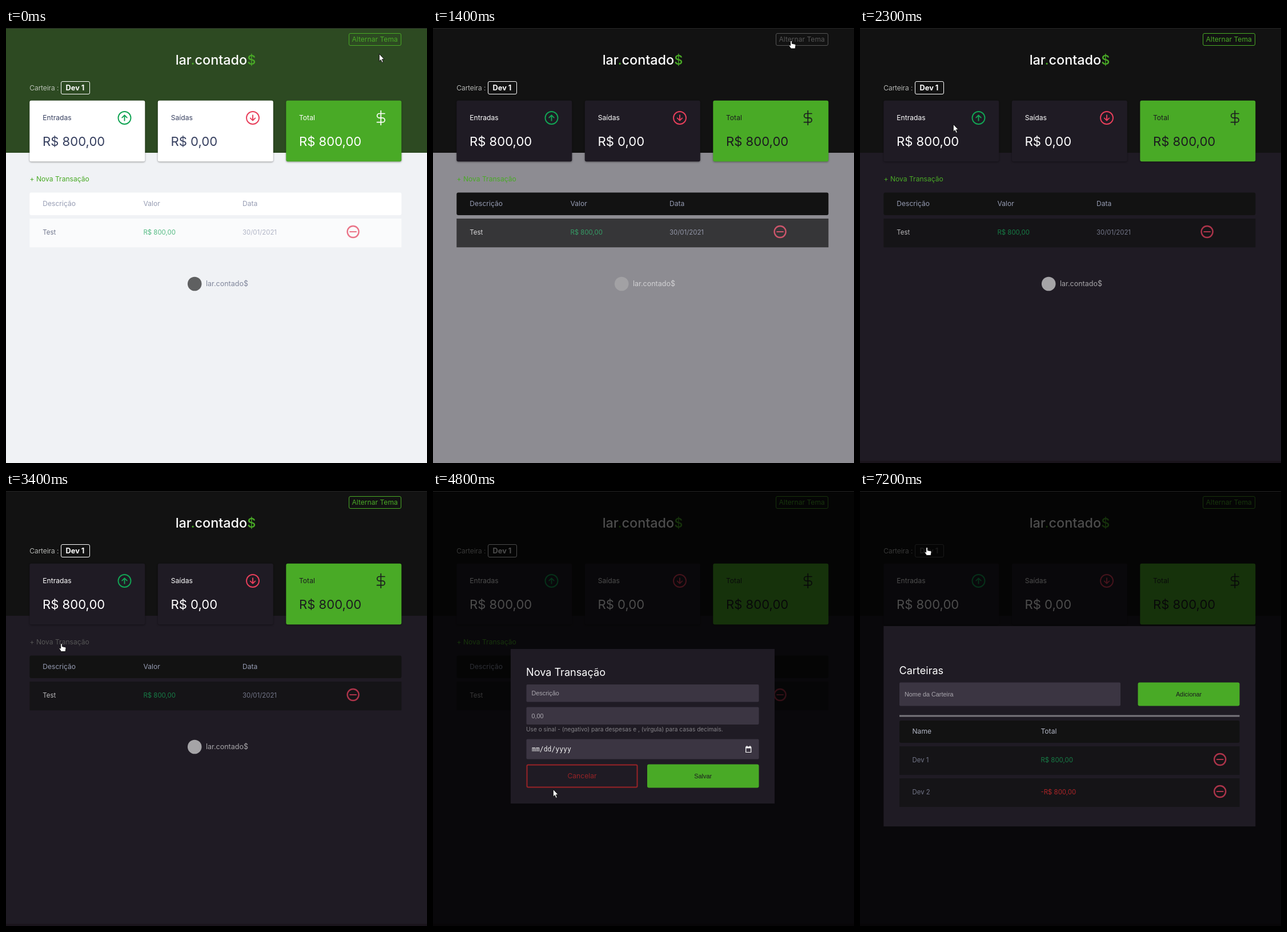
An HTML page for the animation above (8000 ms loop, 737x760 px).

```html
<!DOCTYPE html>
<html lang="pt-BR">
<head>
<meta charset="utf-8">
<title>Carteira</title>
<style>
  html, body { margin: 0; width: 100%; height: 100%; overflow: hidden; }
  svg { display: block; width: 737px; height: 760px; }
  #stage {
    --head: #2d4a22; --card: #fff; --ink: #363f5f; --table: #fff;
    --on-total: #fff; --hover: #3dd705; --green: #49aa26;
    background: var(--page);
    font: 12.1px Inter, "Open Sans", sans-serif;
  }
  #stage.dark {
    --head: #121212; --card: #1f1b24; --ink: #fff; --table: #121212;
    --on-total: #1b1b1f; --hover: #555;
  }
  .head { fill: var(--head); }
  .card { fill: var(--card); filter: drop-shadow(0 1.5px 1.5px rgba(0, 0, 0, .4)); }
  .card.total { fill: var(--green); }
  .ink { fill: var(--ink); }
  .on-total { fill: var(--on-total); }
  .big { font-size: 22.1px; }
  .brand { font-size: 23.4px; font-weight: 500; fill: #fff; }
  .accent { fill: var(--green); }
  .light { font-weight: 300; }
  .table { fill: var(--table); }
  .muted { fill: #969cb3; }
  .row { opacity: .7; font-size: 11.4px; }
  .row.hover { opacity: 1; }
  .plus { fill: #12a454; }
  .minus { fill: #e92929; }
  .line { fill: none; stroke-width: 1.9; stroke-linecap: round; stroke-linejoin: round; }
  .up { stroke: #12a454; }
  .down { stroke: #e83f5b; }
  .dollar { stroke: var(--on-total); stroke-width: 1.7; }
  .link { fill: var(--green); }
  .frame { fill: none; stroke: var(--green); }
  .wallet { fill: #fff; font-size: 12.8px; font-weight: 700; }
  .wallet-frame { fill: none; stroke: #fff; }
  .hover > .link, .hover > .wallet { fill: var(--hover); }
  .hover > .frame, .hover > .wallet-frame { stroke: var(--hover); }
  .footer { opacity: .6; font-size: 12.5px; }
  .edge { fill: #1a141c; visibility: hidden; }
  .settled .edge { visibility: visible; }
  .modal { visibility: hidden; }
  .modal.open { visibility: visible; }
  .shade { fill: #000; fill-opacity: .7; }
  .panel { fill: #1f1b24; }
  .title { font-size: 18.1px; fill: #fff; }
  .field { fill: #3b3542; }
  .ui { font: 10.85px "Liberation Sans", Arial, sans-serif; fill: #aaa7ae; }
  .ui.label { fill: #1b1b1f; text-anchor: middle; }
  .date { font: 11.45px "DejaVu Sans Mono", monospace; fill: #f2f2f2; }
  .help { font-size: 10.15px; fill: #858388; }
  .cancel { opacity: .6; }
  .cancel.hover { opacity: 1; }
  .cancel rect { fill: none; stroke: #e92929; stroke-width: 2; }
  .cancel text { fill: #e92929; text-anchor: middle; }
  .pointer { fill: #fff; stroke: #111; stroke-linejoin: round; }
</style>
</head>
<body>
<svg id="stage" viewBox="0 0 737 760">
  <defs>
    <g id="remove" class="line down">
      <circle r="10" stroke-width="2.4"/>
      <path d="M-5.5 0H5.5"/>
    </g>
    <g id="arrow" class="line">
      <circle r="11"/>
      <path d="M0 4.8V-4.5M-4.3 -.4L0 -4.7L4.3 -.4"/>
    </g>
    <rect id="card" width="202" height="106.5" rx="3"/>
  </defs>

  <rect class="head" width="737" height="218"/>
  <rect width="737" height="1" fill="#242424"/>
  <rect class="edge" y="756" width="737" height="4"/>

  <g id="toggle">
    <rect class="frame" x="600.5" y="9.5" width="91" height="21" rx="2.5"/>
    <text class="link" x="605.5" y="24">Alternar Tema</text>
  </g>
  <text class="brand" x="367" y="64" text-anchor="middle">lar<tspan class="accent">.</tspan>contado<tspan class="accent">$</tspan></text>

  <text class="light" x="41.3" y="108.5" fill="#e4e6e3">Carteira :</text>
  <g id="wallet">
    <rect class="wallet-frame" x="96.5" y="93.5" width="50" height="22" rx="2.5"/>
    <text class="wallet" x="104.5" y="109">Dev 1</text>
  </g>

  <use href="#card" class="card" x="41.3" y="126.7"/>
  <text class="ink" x="64.3" y="161">Entradas</text>
  <text class="ink big" x="64" y="206">R$ 800,00</text>
  <use href="#arrow" class="up" x="207.5" y="157"/>

  <use href="#card" class="card" x="265.8" y="126.7"/>
  <text class="ink" x="288.8" y="161">Saídas</text>
  <text class="ink big" x="288.5" y="206">R$ 0,00</text>
  <use href="#arrow" class="down" transform="translate(432 157) rotate(180)"/>

  <use href="#card" class="card total" x="490.3" y="126.7"/>
  <text class="on-total" x="513" y="161">Total</text>
  <text class="on-total big" x="513" y="206">R$ 800,00</text>
  <path class="line dollar" d="M656.3 144.6V169.2M663 149.5H653.5a3.8 3.8 0 0 0 0 7.6H659.3a3.8 3.8 0 0 1 0 7.6H649.5"/>

  <g id="add"><text class="link" x="41.5" y="268">+ Nova Transação</text></g>

  <rect class="table" x="41.3" y="287.4" width="651" height="39.6" rx="3"/>
  <g class="muted">
    <text x="64.3" y="311">Descrição</text>
    <text x="240.5" y="311">Valor</text>
    <text x="414" y="311">Data</text>
  </g>
  <g id="row" class="row">
    <rect class="table" x="41.3" y="333" width="651" height="50.2"/>
    <text class="ink" x="64.3" y="361">Test</text>
    <text class="plus" x="240.5" y="361">R$ 800,00</text>
    <text class="muted" x="414" y="361">30/01/2021</text>
    <use href="#remove" x="607.6" y="356"/>
  </g>

  <g class="footer">
    <circle id="mark" cx="330.2" cy="447" r="12.3"/>
    <text class="ink" x="350" y="451">lar.contado$</text>
  </g>

  <g id="entry" class="modal">
    <rect class="shade" y="1" width="737" height="759"/>
    <rect class="panel" x="136" y="276" width="462" height="270"/>
    <text class="title" x="163" y="322.5">Nova Transação</text>
    <g class="field">
      <rect x="163.5" y="338" width="407" height="30.5" rx="2"/>
      <rect x="163.5" y="377.5" width="407" height="30.5" rx="2"/>
      <rect x="163.5" y="433.5" width="407" height="35" rx="2"/>
    </g>
    <text class="ui" x="172.5" y="356.5">Descrição</text>
    <text class="ui" x="172.5" y="396.5">0,00</text>
    <text class="help" x="163" y="420">Use o sinal - (negativo) para despesas e , (vírgula) para casas decimais.</text>
    <text class="date" x="173" y="455">mm/dd/yyyy</text>
    <path d="M547.7 448.5h9v8h-9z" fill="none" stroke="#fff" stroke-width="1.2"/>
    <path d="M547.2 446.6h10v3h-10zM548.8 445.3h1.5v2h-1.5zM554.2 445.3h1.5v2h-1.5z" fill="#fff"/>
    <g id="cancel" class="cancel">
      <rect x="164.5" y="478.5" width="193" height="39" rx="2"/>
      <text x="261" y="501.5">Cancelar</text>
    </g>
    <rect class="accent" x="375" y="477.5" width="195.5" height="41" rx="3"/>
    <text class="ui label" x="472.7" y="501.5">Salvar</text>
  </g>

  <g id="wallets" class="modal">
    <rect class="shade" y="1" width="737" height="759"/>
    <rect class="panel" x="41.3" y="236" width="651" height="350"/>
    <text class="title" x="68.5" y="319.5">Carteiras</text>
    <rect class="field" x="69" y="334.5" width="387" height="41" rx="2"/>
    <text class="ui" x="78" y="358.5">Nome da Carteira</text>
    <rect class="accent" x="486.5" y="334.5" width="178" height="41" rx="3"/>
    <text class="ui label" x="575.5" y="358.5">Adicionar</text>
    <rect x="69" y="391.5" width="595.5" height="3" fill="#78767c"/>
    <rect class="table" x="69" y="401" width="595.5" height="39" rx="3"/>
    <text x="91.5" y="424" fill="#b3b7c6">Name</text>
    <text x="316.5" y="424" fill="#b3b7c6">Total</text>
    <g class="row">
      <rect class="table" x="69" y="446" width="595.5" height="50"/>
      <text class="muted" x="91.5" y="474">Dev 1</text>
      <text class="plus" x="316.5" y="474">R$ 800,00</text>
      <use href="#remove" x="630.2" y="469"/>
    </g>
    <g class="row">
      <rect class="table" x="69" y="502" width="595.5" height="50"/>
      <text class="muted" x="91.5" y="530">Dev 2</text>
      <text class="minus" x="316.5" y="530">-R$ 800,00</text>
      <use href="#remove" x="630.2" y="525"/>
    </g>
  </g>

  <g id="cursor" class="pointer">
    <path id="tip" d="M.3 0V13.2L3.2 10.6L5.2 15.4L7.4 14.4L5.4 9.7H9.2z"/>
    <path id="hand" d="M-1.3 .8Q0 -.8 1.4 .8V5.2L6.8 6.3Q8.2 6.8 8 8.4L7 14H-.4L-4 8.7Q-3.8 7 -1.3 8.6z"/>
  </g>
</svg>
<script>
  const LOOP = 8000, STEP = 100, THEME_AT = 1400;
  const $ = id => document.getElementById(id);
  const stage = $('stage');

  // time, x, y of the pointer
  const path = [
    [0, 653, 45], [200, 653, 45], [300, 654, 47], [500, 642, 29], [900, 627, 22],
    [1400, 627, 22], [1700, 500, 62], [2200, 183, 149], [2300, 163, 168],
    [2400, 145, 179], [2600, 145, 179], [2900, 118, 130], [3200, 100, 248],
    [3400, 97, 266.5], [4000, 97, 266.5], [4300, 165, 350], [4600, 244, 450],
    [4800, 210, 521], [4900, 214, 519], [5000, 228, 509], [5300, 252, 497],
    [5700, 252, 497], [5800, 258, 502], [5900, 267.5, 511], [6000, 267.5, 511],
    [6300, 234, 375], [6600, 160, 180], [6900, 117, 98.5], [LOOP, 117, 98.5]
  ];
  const hovers = {
    toggle: [500, 1500], add: [3300, 4100], cancel: [5000, 5800],
    row: [6300, 6400], wallet: [6800, LOOP]
  };
  const modals = { entry: [3600, 5800], wallets: [7200, LOOP] };

  const within = (t, [from, to]) => t >= from && t < to;
  const mix = (a, b, p) => a + (b - a) * p;
  const rgb = (a, b, p) => `rgb(${a.map((v, i) => Math.round(mix(v, b[i], p)))})`;

  function pointerAt(t) {
    const i = path.findIndex(k => k[0] > t);
    const [t0, x0, y0] = path[i - 1], [t1, x1, y1] = path[i];
    const p = (t - t0) / (t1 - t0);
    return [mix(x0, x1, p), mix(y0, y1, p)];
  }

  function fade(t) {
    if (t < THEME_AT) return 0;
    const u = Math.min(1, (t - THEME_AT + 138) / 500);
    return 1 - (1 - u) ** 2;
  }

  function draw(t) {
    const p = fade(t);
    stage.classList.toggle('dark', t >= THEME_AT);
    stage.classList.toggle('settled', p === 1);
    stage.style.setProperty('--page', rgb([240, 242, 245], [31, 27, 36], p));
    $('mark').style.fill = rgb([0, 0, 0], [255, 255, 255], Math.sqrt(p));

    let hand = false;
    for (const id in hovers) {
      const on = within(t, hovers[id]);
      $(id).classList.toggle('hover', on);
      hand ||= on && id !== 'row';
    }
    for (const id in modals) $(id).classList.toggle('open', within(t, modals[id]));

    $('cursor').setAttribute('transform', `translate(${pointerAt(t)})`);
    $('hand').style.display = hand ? '' : 'none';
    $('tip').style.display = hand ? 'none' : '';
  }

  const start = performance.now();
  function tick() {
    const t = (performance.now() - start) % LOOP;
    draw(Math.floor(t / STEP) * STEP);
    requestAnimationFrame(tick);
  }
  tick();
</script>
</body>
</html>
```
